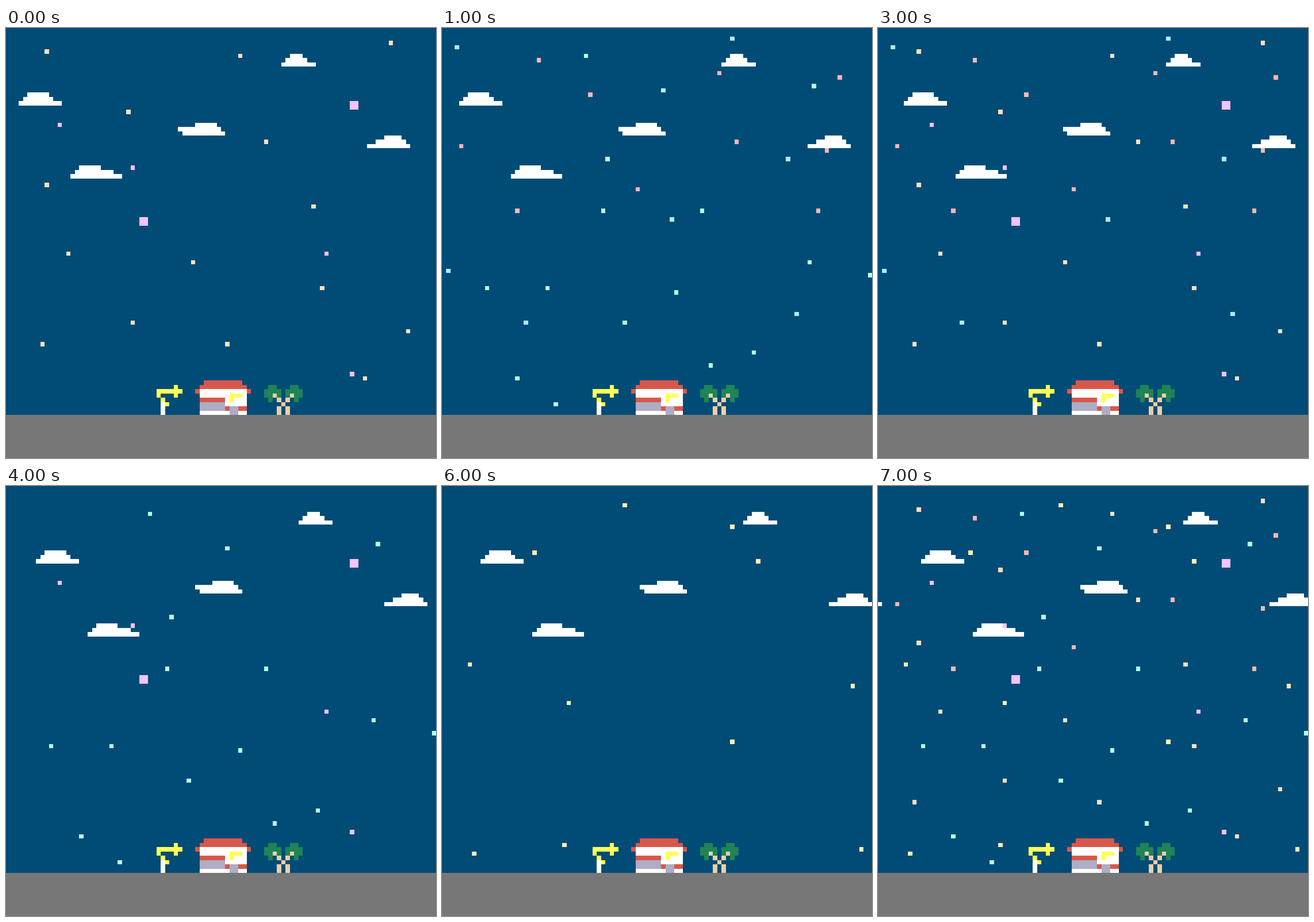
An HTML page with a canvas that plays this animation: 748x748 px, repeating every 8000 ms.

```html
<!DOCTYPE html>
<html lang="en">
<head>
<meta charset="utf-8">
<title>Pixel night</title>
<style>
html, body { margin: 0; width: 100%; height: 100%; overflow: hidden; background: #004c76; }
canvas { display: block; }
</style>
</head>
<body>
<canvas id="stage" width="748" height="748"></canvas>
<script>
const ctx = document.getElementById('stage').getContext('2d');
const CELL = 7.48, COLS = 100, STEP = 1000, STEPS = 8;
const RED = '#d9574a', YELLOW = '#ffff57', LAVENDER = '#adadc6', GREEN = '#1f8457', TAN = '#efcfa3';

// lit: one digit per step; stars: column,row[,size]
const group = (color, lit, stars) => ({ color, lit, stars: stars.split(' ').map(s => s.split(',').map(Number)) });

const backStars = [
  group('#ffdfba', '10010101', '9,5 54,6 89,3 28,19 60,26 9,36 71,41 14,52 43,54 73,60 29,68 8,73 51,73 93,70 83,81'),
  group('#f7b7b2', '01010001', '22,7 64,10 92,11 34,15 4,27 68,26 89,28 45,37 17,42 87,42'),
  group('#b5ffdf', '01101001', '33,6 51,14 86,13 38,30 37,42 60,42 85,54 99,57 10,60 24,60 54,61 42,68 72,75 62,78 17,81 26,87'),
  group('#b2e9f8', '01010100', '3,4 67,2 6,17 80,30 53,44 1,56 19,68 82,66'),
  group('#fff0b0', '00100011', '42,4 67,9 21,15 73,17 6,41 29,50 95,46 67,59 28,83 7,85 97,84')
];
const frontStars = group('#f7c2f9', '10111001', '12,22 29,32 74,52 80,80 80,17,2 31,44,2');

// top row, then [column, width] for each row downwards
const clouds = [
  [15, [5, 5], [4, 7], [3, 10]],
  [6, [66, 3], [65, 5], [64, 8]],
  [22, [44, 5], [40, 10], [41, 10]],
  [25, [88, 4], [86, 7], [84, 10]],
  [32, [17, 5], [16, 9], [15, 12]]
];

function box(color, x, y, w = 1, h = 1) {
  const px = n => Math.round(n * CELL);
  ctx.fillStyle = color;
  ctx.fillRect(px(x), px(y), px(x + w) - px(x), px(y + h) - px(y));
}

function drawStars({ color, lit, stars }, step) {
  if (lit[step] === '1') for (const [x, y, size = 1] of stars) box(color, x, y, size, size);
}

function drawClouds(shift) {
  for (const [top, ...rows] of clouds) {
    rows.forEach(([x, w], i) => {
      box('#fff', x + shift, top + i, w);
      box('#fff', x + shift - COLS, top + i, w);
    });
  }
}

function drawLamp() {
  box(YELLOW, 39, 83, 1, 3);
  box(YELLOW, 35, 84, 6);
  box(YELLOW, 35, 85);
  box(YELLOW, 36, 86);
  box(YELLOW, 37, 87);
  box('#fff', 36, 87, 1, 3);
}

function drawHouse() {
  box(RED, 46, 82, 9);
  box(RED, 45, 83, 11);
  box(RED, 44, 84, 13);
  box('#fff', 45, 84, 11, 6);
  box(YELLOW, 52, 85, 3);
  box(YELLOW, 52, 86);
  box(RED, 45, 86, 6);
  box(LAVENDER, 45, 87, 6, 2);
  box(RED, 51, 88, 5);
  box(LAVENDER, 52, 88, 2, 2);
}

function drawPalms() {
  // The pair is symmetric about column 64.
  for (const side of [-1, 1]) {
    const part = (color, near, y, w = 1, h = 1) =>
      box(color, side > 0 ? 64 + near : 65 - near - w, y, w, h);
    part(GREEN, 2, 83, 2);
    part(GREEN, 1, 84, 4, 2);
    part(GREEN, 3, 86);
    part(TAN, 2, 85);
    part(TAN, 1, 86);
    part(TAN, 1, 88, 1, 2);
  }
  box(TAN, 64, 87);
}

function draw(now) {
  const step = Math.floor(now / STEP) % STEPS;
  box('#004c76', 0, 0, COLS, COLS);
  backStars.forEach(stars => drawStars(stars, step));
  drawClouds(step);
  drawStars(frontStars, step);
  box('#777', 0, 90, COLS, 10);
  drawLamp();
  drawHouse();
  drawPalms();
}

const start = performance.now();
function tick() {
  draw(performance.now() - start);
  requestAnimationFrame(tick);
}
tick();
</script>
</body>
</html>
```
